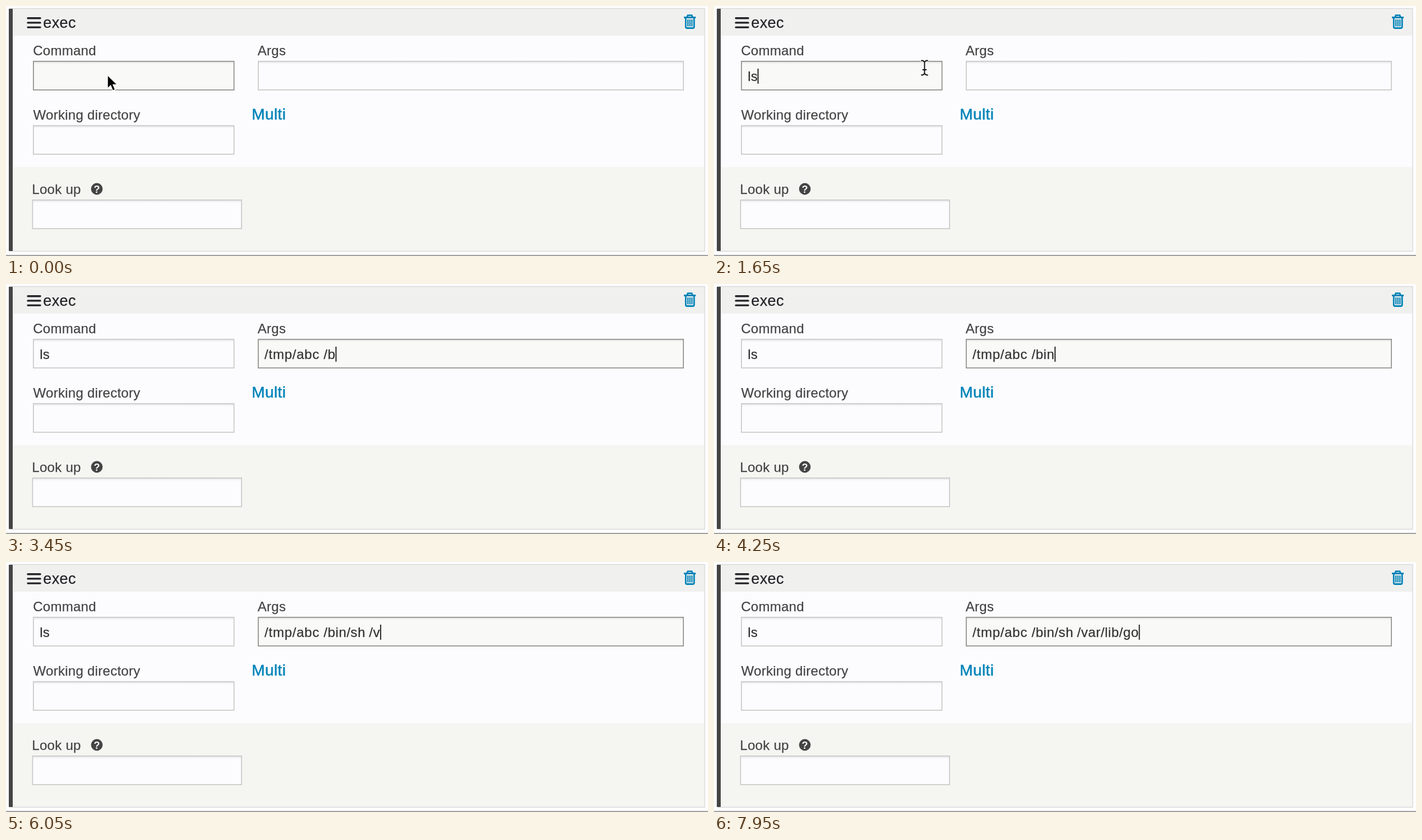
Animation of 1252 by 447 pixels, one loop 8000 ms. Source, as an HTML page:

```html
<!DOCTYPE html>
<html lang="en">
<head>
<meta charset="utf-8">
<title>exec task form</title>
<style>
  html, body { margin: 0; width: 100%; height: 100%; overflow: hidden; background: #fdfdff; }
  svg { display: block; width: 1252px; height: 447px; }
  text { font: 24px "Liberation Sans", Arial, sans-serif; fill: #444; stroke: #444; stroke-width: .25; white-space: pre; }
  .label { letter-spacing: .28px; }
  .typed { fill: #333; stroke: #333; }
  .title { font-size: 27px; letter-spacing: .4px; fill: #222228; stroke: #222228; }
  .link { font-size: 28px; letter-spacing: .4px; fill: #0083b8; stroke: #0083b8; stroke-width: .5; }
  .mark { font-size: 18px; font-weight: bold; fill: #fafafa; stroke: none; }
  .field { fill: #fcfcff; stroke: #c9c9c6; stroke-width: 1.7; }
  .field.focus { fill: #f9f9f8; stroke: #8f8f8a; }
</style>
</head>
<body>
<svg viewBox="0 0 1252 447">
  <defs>
    <linearGradient id="inset" x1="0" y1="0" x2="0" y2="1">
      <stop offset="0" stop-color="#000" stop-opacity=".08"/>
      <stop offset="1" stop-color="#000" stop-opacity="0"/>
    </linearGradient>
  </defs>

  <rect x="12" y="4" width="1234" height="49" fill="#f0f0ef"/>
  <rect x="12" y="53" width="1234" height="235" fill="#fcfcff"/>
  <rect x="12" y="288" width="1234" height="150" fill="#f5f5f2"/>
  <path d="M6 4.5H1246V438.5H6" fill="none" stroke="#d9d9dc" stroke-width="1.4"/>
  <rect x="5" y="5" width="7" height="433" fill="#444"/>
  <rect y="445" width="1252" height="2" fill="#a0a0a0"/>

  <path d="M39 21.7H61M39 29.9H61M39 38.1H61" stroke="#222228" stroke-width="3.4" stroke-linecap="round"/>
  <text class="title" x="66.3" y="39">exec</text>

  <g fill="none" stroke="#0083b8" stroke-width="2.8">
    <path d="M1209 20.5H1230M1214.5 20L1216 16.6H1223L1224.5 20M1212.3 21V37.2Q1212.3 39.5 1214.6 39.5H1224.9Q1227.2 39.5 1227.2 37.2V21"/>
    <path d="M1216.2 24V36.5M1219.75 24V36.5M1223.3 24V36.5" stroke-width="2.2"/>
  </g>

  <text class="label" x="48.2" y="88">Command</text>
  <text class="label" x="448.8" y="88">Args</text>
  <text class="label" x="48.5" y="203">Working directory</text>
  <text class="label" x="46.3" y="336">Look up</text>
  <text class="link" x="438.2" y="203">Multi</text>

  <circle cx="162" cy="327" r="10.4" fill="#444"/>
  <text class="mark" x="162" y="333.6" text-anchor="middle">?</text>

  <g id="fields"></g>
  <g id="words"></g>
  <rect id="caret" y="112" width="1.8" height="27" fill="#111"/>

  <path id="arrow" d="M0 0V24L5.6 18.8L9.4 28L13.8 26.2L10 17.2H17.6Z" fill="#000" stroke="#fff" stroke-width="1.4"/>
  <g id="beam" fill="none" stroke-linecap="round">
    <path d="M-5.5-13Q-1-13 0-9.5Q1-13 5.5-13M0-9.5V9.5M-5.5 13Q-1 13 0 9.5Q1 13 5.5 13M-3 3.5H3" stroke="#fff" stroke-width="4"/>
    <path d="M-5.5-13Q-1-13 0-9.5Q1-13 5.5-13M0-9.5V9.5M-5.5 13Q-1 13 0 9.5Q1 13 5.5 13M-3 3.5H3" stroke="#111" stroke-width="2"/>
  </g>
</svg>
<script>
const LOOP = 8000, STEP = 50, FOCUS_ARGS = 2000;
const $ = id => document.getElementById(id);

function add(parent, tag, attrs) {
  const node = document.createElementNS('http://www.w3.org/2000/svg', tag);
  for (const key in attrs) node.setAttribute(key, attrs[key]);
  return parent.appendChild(node);
}

function field(x, y, w, h) {
  const box = add($('fields'), 'rect', { x: x + .9, y: y + .9, width: w - 1.8, height: h - 1.8, class: 'field' });
  add($('fields'), 'rect', { x: x + 1.8, y: y + 1.8, width: w - 3.6, height: 4, fill: 'url(#inset)' });
  return box;
}

const command = field(48, 98, 359.5, 53);
const args = field(449, 98, 760, 53);
field(48, 213, 359.5, 53);
field(46.5, 346, 374.5, 53);

// Each word: start position, letter spacing and the time of every key.
const words = [
  { x: 60.3, gap: 0, text: 'ls', keys: [900, 1200] },
  { x: 461, gap: .78, text: '/tmp/abc ', keys: [2350, 2500, 2600, 2700, 2850, 2950, 3050, 3150, 3250] },
  { x: 566.5, gap: .55, text: '/bin/sh ', keys: [3350, 3450, 3700, 3950, 4300, 5200, 5350, 5550] },
  { x: 647.5, gap: .55, text: '/var/lib/go', keys: [5750, 6050, 6200, 6350, 6450, 6550, 6650, 6750, 7300, 7600, 7800] }
];
for (const word of words)
  word.node = add($('words'), 'text', { x: word.x, y: 134, class: 'typed', style: `letter-spacing:${word.gap}px` });

// Text pointer: time, x, y
const path = [[1350, 186, 126], [1650, 375.5, 110.5], [1900, 525, 131], [2350, 525, 131]];

function pointerAt(t) {
  const i = path.findIndex(p => p[0] > t);
  if (i < 1) return null;
  const [a, b] = [path[i - 1], path[i]];
  const k = (t - a[0]) / (b[0] - a[0]);
  return [a[1] + (b[1] - a[1]) * k, a[2] + (b[2] - a[2]) * k];
}

function show(node, visible) {
  node.setAttribute('visibility', visible ? 'visible' : 'hidden');
}

function draw(t) {
  const inArgs = t >= FOCUS_ARGS;
  command.classList.toggle('focus', !inArgs);
  args.classList.toggle('focus', inArgs);

  let caretX = inArgs ? 461 : 60.5;
  let lastInput = inArgs ? FOCUS_ARGS : -600;
  words.forEach((word, i) => {
    const count = word.keys.filter(k => k <= t).length;
    word.node.textContent = word.text.slice(0, count);
    if (count && (i > 0) === inArgs) {
      caretX = word.x + word.node.getComputedTextLength();
      lastInput = word.keys[count - 1];
    }
  });
  $('caret').setAttribute('x', caretX);
  show($('caret'), (t - lastInput) % 1000 < 500);

  $('arrow').setAttribute('transform', 'translate(181 123.5)');
  show($('arrow'), t < 900);
  const pos = pointerAt(t);
  show($('beam'), pos);
  if (pos) $('beam').setAttribute('transform', `translate(${pos})`);
}

const start = performance.now();
function tick() {
  const t = (performance.now() - start) % LOOP;
  draw(Math.floor(t / STEP) * STEP);
  requestAnimationFrame(tick);
}
tick();
</script>
</body>
</html>
```
